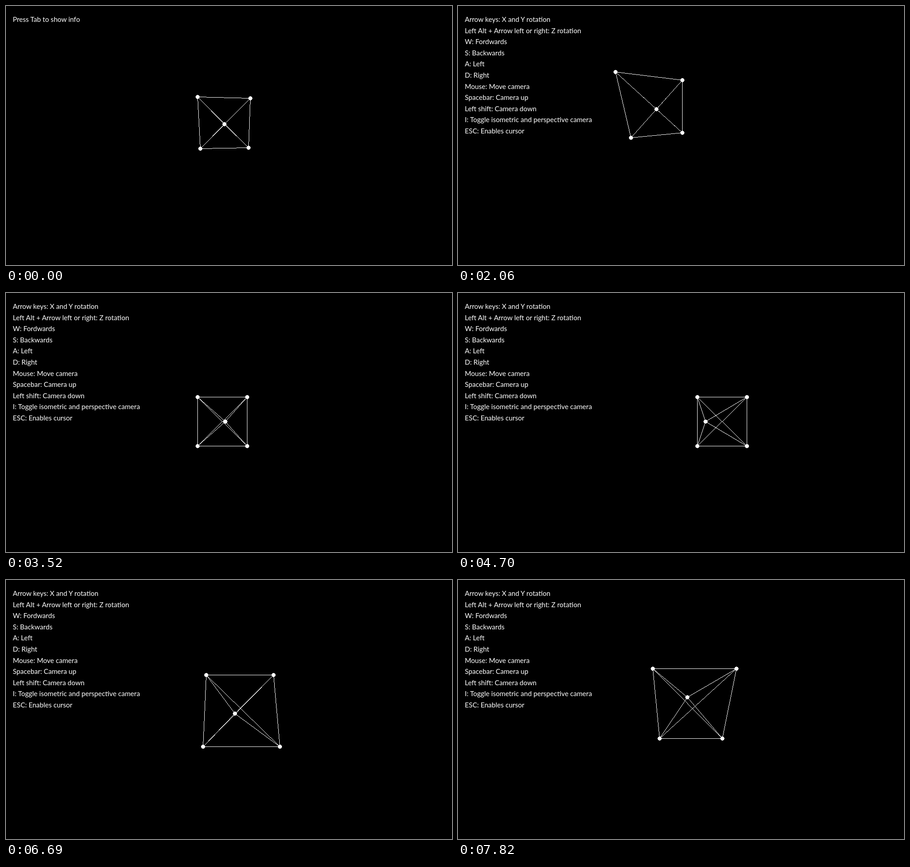
Recreate the animation shown at these times as an HTML page with a canvas. Size 981 px wide and 571 px high, loop 8000 ms.

```html
<!DOCTYPE html>
<html lang="en">
<head>
<meta charset="utf-8">
<title>Wireframe pyramid</title>
<style>
  html, body { margin: 0; width: 100%; height: 100%; overflow: hidden; background: #000; }
  canvas { position: absolute; left: 0; top: 0; display: block; }
  .info {
    position: absolute; left: 15px; top: 17px; margin: 0;
    font: 15.1px/24.6px Lato, Carlito, sans-serif; color: #fff; white-space: pre;
  }
</style>
</head>
<body>
<canvas id="stage" width="981" height="571"></canvas>
<div class="info" id="hint">Press Tab to show info</div>
<div class="info" id="help" hidden>Arrow keys: X and Y rotation
Left Alt + Arrow left or right: Z rotation
W: Fordwards
S: Backwards
A: Left
D: Right
Mouse: Move camera
Spacebar: Camera up
Left shift: Camera down
I: Toggle isometric and perspective camera
ESC: Enables cursor</div>
<script>
const LOOP = 8000, HELP_AT = 400;
const CENTER = { x: 490.5, y: 283 };
const FOCAL = CENTER.y / Math.tan(Math.PI / 3); // 120 degree vertical field of view

const points = [[-1, 1, 0], [1, 1, 0], [1, -1, 0], [-1, -1, 0], [0, 0, 2]];
const edges = [[0, 1], [1, 2], [2, 3], [3, 0], [0, 2], [1, 3], [0, 4], [1, 4], [2, 4], [3, 4]];

// Angles in degrees; x and dist place the pyramid relative to the camera.
const rest = { yaw: -3.5, pitch: 8, x: 0, dist: 3, tilt: 0 };

// Each move advances in even steps; keys are [step, value].
const moves = [
  { from: 1140, to: 1930, steps: 13, yaw: [[7, 43.5], [8, 44], [13, -15]], pitch: [[7, 7.3], [13, 8]] },
  { from: 2000, to: 2790, steps: 12, yaw: [[5, -21.5], [10, -19.7], [12, -7]], pitch: [[5, 35], [10, 2.28], [12, -4.3]] },
  { from: 2860, to: 3260, steps: 7, yaw: [[4, 22.3], [7, 0]], pitch: [[4, 2.2], [7, 0]] },
  { from: 3520, to: 3780, steps: 5, x: [[1, -0.27], [5, -1.86]] },
  { from: 3980, to: 4770, steps: 12, x: [[10, 1.87], [11, 1.65], [12, 1.16]] },
  { from: 4840, to: 5360, steps: 8, x: [[8, 0.318]] },
  { from: 5630, to: 6100, steps: 8, dist: [[8, 2.07]] },
  { from: 6690, to: 7090, steps: 7, tilt: [[1, 7.5], [7, 72.5]] },
  { from: 7290, to: 7820, steps: 9, tilt: [[9, -17.5]] }
];

const ctx = document.getElementById('stage').getContext('2d');
const hint = document.getElementById('hint');
const help = document.getElementById('help');

function valueAt(start, keys, step) {
  let s0 = 0, v0 = start;
  for (const [s1, v1] of keys) {
    if (step <= s1) return v0 + (v1 - v0) * (step - s0) / (s1 - s0);
    s0 = s1;
    v0 = v1;
  }
  return v0;
}

function poseAt(t) {
  const pose = { ...rest };
  for (const m of moves) {
    if (t < m.from) break;
    const gap = (m.to - m.from) / (m.steps - 1);
    const step = Math.min(m.steps, Math.floor((t - m.from) / gap + 0.2) + 1);
    for (const name in rest) {
      if (m[name]) pose[name] = valueAt(pose[name], m[name], step);
    }
  }
  return pose;
}

function turn(a, b, degrees) {
  const r = degrees * Math.PI / 180, c = Math.cos(r), s = Math.sin(r);
  return [a * c + b * s, b * c - a * s];
}

function project([x, y, z], pose) {
  [y, z] = turn(y, z, -pose.tilt);
  x += pose.x;
  z += pose.dist;
  [x, z] = turn(x, z, pose.yaw);
  [y, z] = turn(y, z, pose.pitch);
  return [Math.round(CENTER.x + FOCAL * x / z), Math.round(CENTER.y - FOCAL * y / z)];
}

// Hard-edged one pixel line
function line([x0, y0], [x1, y1]) {
  const n = Math.max(Math.abs(x1 - x0), Math.abs(y1 - y0), 1);
  for (let i = 0; i <= n; i++) {
    ctx.fillRect(Math.round(x0 + (x1 - x0) * i / n), Math.round(y0 + (y1 - y0) * i / n), 1, 1);
  }
}

function dot([x, y]) {
  for (let dy = -4; dy <= 4; dy++) {
    const half = Math.floor(Math.sqrt(18 - dy * dy));
    ctx.fillRect(x - half, y + dy, half * 2 + 1, 1);
  }
}

function draw(t) {
  const pose = poseAt(t);
  const spots = points.map(p => project(p, pose));
  ctx.fillStyle = '#000';
  ctx.fillRect(0, 0, 981, 571);
  ctx.fillStyle = '#fff';
  for (const [a, b] of edges) line(spots[a], spots[b]);
  spots.forEach(dot);
  hint.hidden = t >= HELP_AT;
  help.hidden = t < HELP_AT;
}

const begin = performance.now();
function tick() {
  draw((performance.now() - begin) % LOOP);
  requestAnimationFrame(tick);
}
tick();
</script>
</body>
</html>
```
